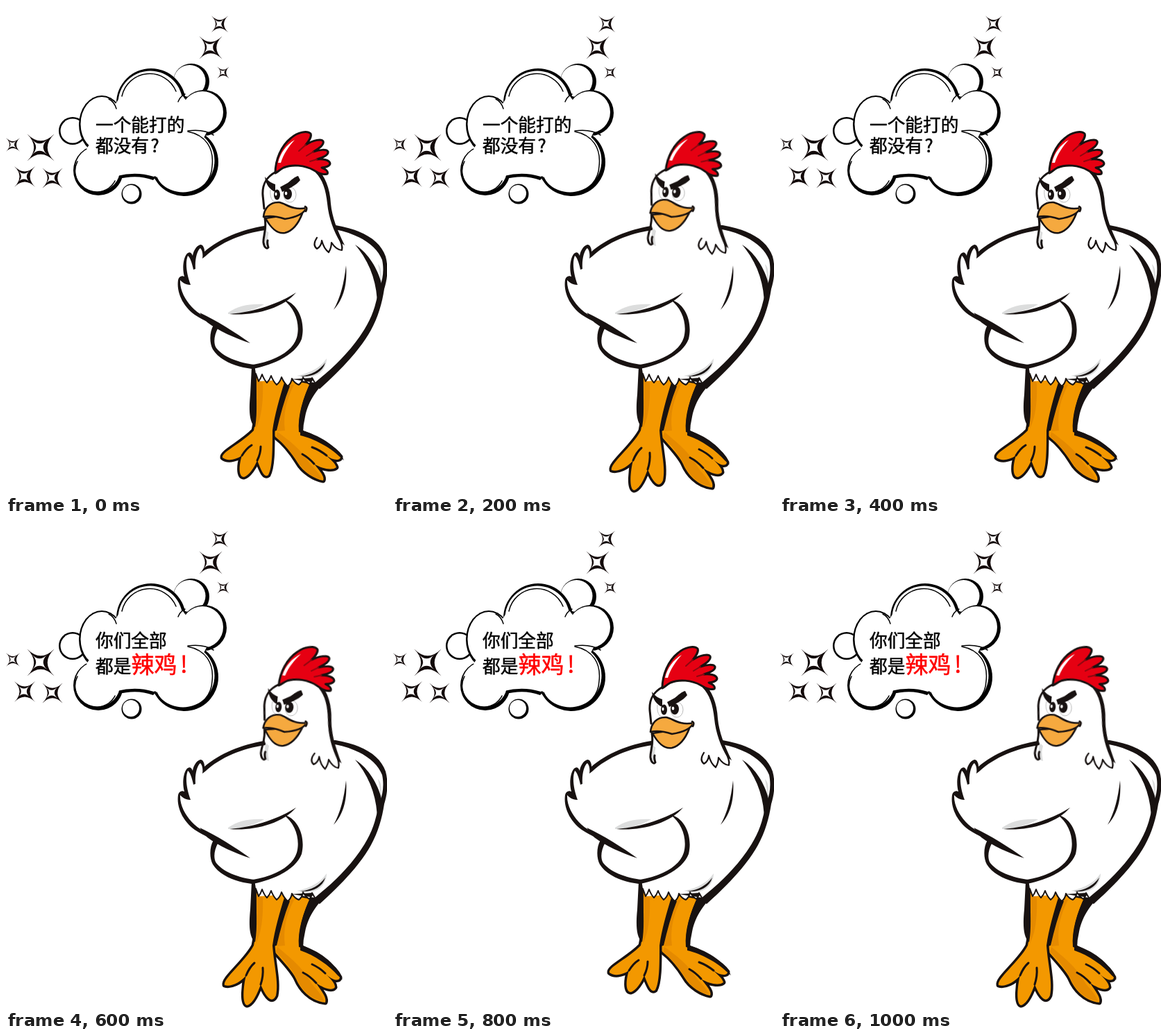
Write an HTML page that moves like this. It is 549 px wide and 702 px high and loops after 1.2 s.

```html
<!DOCTYPE html>
<html lang="zh">
<head>
<meta charset="utf-8">
<title>Proud rooster</title>
<style>
html, body { margin: 0; width: 100%; height: 100%; overflow: hidden; background: #fff; }
svg { display: block; width: 549px; height: 702px; }
text { font-family: "Noto Sans CJK SC", "Noto Sans CJK", sans-serif; font-size: 25.7px; stroke: #000; stroke-width: .5px; }
.big { font-size: 33px; fill: #f00; stroke: #f00; }

.ink { fill: #181211; }
.white { fill: #fff; }
.gray { fill: #dcdddd; }
.shade { fill: #e58a00; }
.leg { fill: #f39800; stroke: #181211; stroke-width: 7; stroke-linejoin: round; paint-order: stroke; }
.line { fill: none; stroke: #181211; stroke-width: 3; stroke-linecap: round; stroke-linejoin: round; }
.thin { stroke-width: 2; }
.fringe { fill: #fff; stroke-width: 2.2; }
.beak { fill: #f5a93f; stroke-width: 2.6; }

/* hard switches: shown for the first half, hidden for the second */
@keyframes show { 0% { visibility: visible; } 50%, 100% { visibility: hidden; } }
@keyframes tilt { 0% { transform: none; } 50%, 100% { transform: rotate(5deg) translate(0, -2px); } }
.up, .down { animation: show 400ms steps(1) infinite; }
.down { animation-delay: -200ms; }
.say1, .say2 { animation: show 1200ms steps(1) infinite; }
.say2 { animation-delay: -600ms; }
.head { transform-origin: 412px 295px; animation: tilt 400ms steps(1) infinite; }
</style>
</head>
<body>
<svg viewBox="0 0 549 702">
  <defs>
    <path id="spark" d="M-1-1Q0 0 1-1Q0 0 1 1Q0 0-1 1Q0 0-1-1Z"/>
    <g id="star">
      <use href="#spark" fill="#120808"/>
      <use href="#spark" fill="#fff" transform="translate(-.08 -.03) scale(.54)"/>
    </g>
    <path id="hem" d="M360 530L364 541Q367 537 369 531Q372 539 376 543Q380 539 382 533Q385 541 390 546Q395 542 397 535Q401 544 406 548Q411 544 412 537Q416 544 422 546Q427 542 428 535Q432 542 437 545Q441 541 441 536L445 543"/>
  </defs>

  <use href="#star" transform="translate(308 26) scale(12)"/>
  <use href="#star" transform="translate(295 60) scale(16.5)"/>
  <use href="#star" transform="translate(313 96) scale(8.5)"/>
  <use href="#star" transform="translate(10 200) scale(10)"/>
  <use href="#star" transform="translate(50 204) scale(19.5)"/>
  <use href="#star" transform="translate(27 246) scale(15)"/>
  <use href="#star" transform="translate(67 248) scale(14.5)"/>

  <!-- thought cloud -->
  <g>
    <g fill="#000">
      <circle cx="267" cy="109" r="26"/>
      <circle cx="96" cy="180" r="20"/>
      <circle cx="181" cy="271" r="14.5"/>
    </g>
    <g class="white">
      <circle cx="264.5" cy="108" r="23"/>
      <circle cx="96" cy="180" r="17.5"/>
      <circle cx="180" cy="270" r="12"/>
    </g>
    <g fill="#000">
      <circle cx="209" cy="140" r="50"/>
      <circle cx="285" cy="154" r="33"/>
      <ellipse cx="138" cy="171" rx="33" ry="42"/>
      <circle cx="133" cy="237" r="36"/>
      <circle cx="257" cy="225" r="49"/>
      <path d="M113 207L160 250Q188 242 212 251L240 220L150 190Z"/>
    </g>
    <g class="white">
      <circle cx="208" cy="140" r="46.5"/>
      <circle cx="283" cy="153" r="30"/>
      <ellipse cx="138" cy="170" rx="30.5" ry="39"/>
      <circle cx="132" cy="235" r="32.5"/>
      <circle cx="255" cy="223" r="45.5"/>
      <path d="M116 206L160 245Q188 238 213 246L270 220L290 180L255 130L165 130Z"/>
    </g>
    <g fill="none" stroke="#000" stroke-width="1.5" stroke-linecap="round">
      <path d="M167 130A41 41 0 0 1 245 123"/>
      <path d="M103 224A29.500 29.500 0 0 0 157 252"/>
      <path d="M217 247A42 42 0 0 0 297 231C300 205 288 186 262 181"/>
      <path d="M262 180Q285 177 299 186"/>
      <path d="M148 134Q156 138 159 148M248 138Q251 130 258 127"/>
    </g>
  </g>

  <g class="say1">
    <text x="129" y="181">一个能打的</text>
    <text x="129" y="210.5">都没有</text>
    <text x="208.5" y="210.5">?</text>
  </g>
  <g class="say2">
    <text x="129" y="182">你们全部</text>
    <text x="129" y="218.5">都是</text>
    <text class="big" x="180.5" y="219">辣鸡</text>
    <text class="big" x="251" y="219">!</text>
  </g>

  <!-- legs, short stance -->
  <g class="up">
    <path class="leg" d="M402 540C396 565 391 590 389 612C386 613 385 616 388 621C400 630 412 645 420 658C428 672 445 682 457 684C460 678 450 668 444 660C455 667 470 670 476 665C474 658 466 653 462 648C470 655 482 656 482 650C472 636 445 622 424 614C420 600 425 570 440 540Z"/>
    <path class="shade" d="M391 614C408 626 426 640 438 660C446 668 453 676 455 682C440 680 428 670 420 656C412 645 402 632 389 621Z"/>
    <path class="leg" d="M360 528L402 540C394 565 387 590 384 612C384 640 384 665 378 676C372 681 368 670 362 655C358 665 350 677 343 679C334 679 336 660 340 648C330 655 318 656 312 651C310 643 340 630 357 612C362 590 361 560 360 528Z"/>
    <path class="line" d="M340 648Q346 638 354 633M362 655Q367 645 367 635M444 660Q436 651 427 646M462 648Q452 640 441 636"/>
    <path class="ink" d="M424 611C450 618 478 634 487 655L480 649C468 637 445 624 424 619Z"/>
  </g>

  <!-- legs, long stance -->
  <g class="down">
    <path class="leg" d="M402 540C396 565 391 590 389 612C386 613 385 616 388 622C402 638 412 648 418 660C424 674 438 692 460 694C463 686 452 675 447 666C457 673 470 678 474 672C474 665 466 659 460 652C468 661 480 665 481 658C473 641 447 624 424 614C420 600 425 570 440 540Z"/>
    <path class="shade" d="M391 614C408 628 428 644 440 666C448 676 456 684 458 692C440 690 426 676 419 660C412 646 402 634 389 621Z"/>
    <path class="leg" d="M360 528L402 540C394 565 387 590 384 612C386 640 393 665 389 684C384 695 376 690 367 668C362 682 355 697 347 698C340 696 342 670 346 655C338 665 324 672 315 669C312 660 345 635 357 612C362 590 361 560 360 528Z"/>
    <path class="line" d="M346 655Q351 643 358 637M367 668Q371 656 370 644M447 666Q438 656 428 651M460 652Q452 644 441 639"/>
    <path class="ink" d="M424 611C450 619 475 636 485 661L478 655C466 641 445 626 424 619Z"/>
  </g>
  <path class="shade" d="M361 535L370 543C371 570 368 595 360 609C363 590 362 560 361 535ZM406 545L415 546C404 568 399 588 402 612L391 613C392 590 398 565 406 545Z"/>
  <path class="ink" d="M354 520L361 528C360 560 363 585 359 607C350 600 350 580 352 560Z"/>
  <path class="ink" d="M402 545L409 548C401 568 395 590 390 612L386 612C388 590 395 565 402 545Z"/>
  <path class="ink" d="M440 540L472 528C448 552 436 568 431 592Q428 604 428 616L422 614C420 590 428 565 440 540Z"/>

  <!-- body -->
  <path class="ink" d="M372 317C340 322 308 335 286 354C286 349 284 344 280 344C274 346 270 353 269 360C267 354 263 354 260 358C255 365 254 380 257 390C253 388 249 390 248 395C245 415 258 437 275 447C285 453 294 457 299 460C293 470 293 486 298 495C308 511 330 520 354 523L362 532L440 545L452 552C482 525 510 496 526 467C536 449 542 428 545 408C550 392 551 376 547 361C539 338 515 323 475 316Z"/>
  <path class="white" d="M374 323C340 328 310 340 287 361L283 364C284 358 283 352 280 349C275 353 272 366 273 379L270 380C268 370 265 362 262 360C258 370 260 385 266 402C260 402 254 399 251 395C250 412 262 432 280 444C292 450 302 454 306 463C299 476 299 487 303 493C315 508 340 515 358 517L360 530L364 541L441 536L445 543L452 537C488 508 524 467 533 427L539 404C543 393 545 380 542 366C534 346 510 329 474 322Z"/>
  <use href="#hem" class="white"/>
  <use href="#hem" class="line thin"/>

  <g class="gray">
    <path d="M320 442C335 432 350 429 372 430C355 440 335 444 320 444Z"/>
    <path d="M419 533C440 529 454 520 462 508C462 524 450 535 434 535Z"/>
    <path d="M536 372Q543 378 540 400Q539 385 536 372Z"/>
    <path d="M375 312L381 320Q375 330 379 346L373 344Q372 332 375 312Z"/>
  </g>
  <g class="ink">
    <path d="M503 344C522 356 537 380 542 404L535 432C535 400 525 370 503 344Z"/>
    <path d="M490 374C492 400 487 422 472 438C482 420 487 400 490 374Z"/>
    <path d="M418 413C395 428 360 441 322 444C355 447 398 437 418 413Z"/>
    <path d="M279 442C303 453 331 471 352 486C330 479 306 468 290 456Z"/>
    <path d="M399 423C421 428 432 455 426 480C418 501 390 516 356 523L356 517C390 511 413 497 419 478C424 460 418 436 399 423Z"/>
    <path d="M424 534C440 532 452 525 460 514C456 528 442 535 424 534Z"/>
  </g>

  <!-- head -->
  <g class="head">
    <path class="white" d="M390 236C375 246 370 258 371 275L375 310C376 316 376 320 375 324L390 335L448 338L484 340C474 318 468 300 466 280C465 262 460 248 450 236Z"/>
    <path class="line" d="M389 239C374 247 369 258 370 273L372 292M373 306C376 322 370 334 371 341C372 348 376 351 378 348Q376 343 377 338"/>
    <path class="line fringe" d="M448 334C444 340 443 346 448 350C452 348 455 343 455 338C457 346 461 352 465 355C468 350 469 345 469 341C473 347 479 352 484 352C486 344 480 335 477 328"/>
    <path class="ink" d="M448 234C459 244 467 262 468 285C470 305 477 322 488 345L482 341C472 325 465 305 463 285C461 265 456 250 446 240Z"/>

    <path d="M388 241C388 222 396 202 411 190C420 182 434 179 439 184C441 189 436 195 432 200C443 193 455 191 457 195C459 200 450 206 443 210C452 207 462 206 464 210C465 215 455 219 448 221C457 220 466 222 467 227C467 231 459 233 455 233C460 235 465 238 463 242C455 244 449 240 444 237C430 229 412 228 400 233C394 236 391 240 388 241Z" fill="#e60012" stroke="#181211" stroke-width="3" stroke-linejoin="round"/>
    <path class="white" d="M392 226C395 212 404 200 416 193C407 203 400 213 396 226Z"/>
    <path fill="none" stroke="#8c0710" stroke-width="2" stroke-linecap="round" d="M432 200L422 209M443 210L433 216M448 221L438 224"/>

    <g fill="none" stroke="#bbb">
      <ellipse cx="409" cy="272" rx="9" ry="11"/>
      <path d="M381 265C380 275 383 282 389 283"/>
    </g>
    <g class="ink">
      <ellipse cx="390.500" cy="272" rx="4.500" ry="7.500"/>
      <ellipse cx="406" cy="271" rx="6" ry="8"/>
      <path d="M373 246C377 252 382 255 388 257L388 268C380 265 374 257 373 246Z"/>
      <path d="M395 261L406 255C411 251 416 246 421 245L424 251C418 259 406 264 398 268Z"/>
    </g>
    <g class="white">
      <ellipse cx="389" cy="271" rx="1.500" ry="2.500"/>
      <ellipse cx="403.500" cy="270" rx="1.800" ry="2.500"/>
    </g>

    <path class="line beak" d="M374 306C381 319 391 329 402 327C414 324 422 312 427 299L400 302Z"/>
    <path class="line beak" d="M371 304C372 292 380 282 394 283C404 285 412 295 433 291C429 300 415 305 402 307C390 303 380 302 371 304Z"/>
    <path class="line beak" d="M431 289Q435 291 432 296"/>
  </g>
</svg>
</body>
</html>
```
